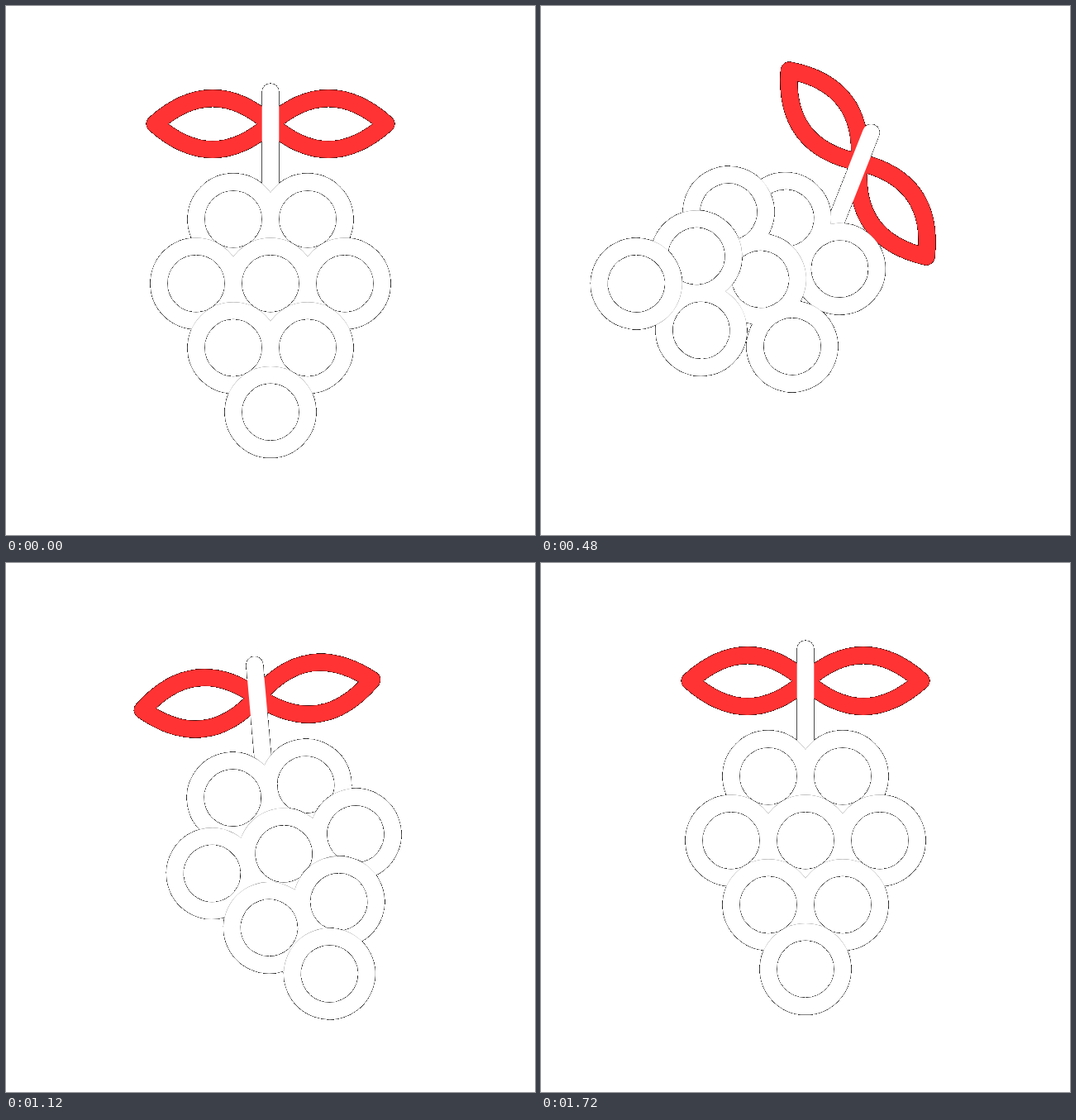
An HTML page with a canvas that plays this animation: 640 px wide and 640 px high, repeating every 2000 ms.

```html
<!DOCTYPE html>
<html lang="en">
<head>
<meta charset="utf-8">
<title>Swinging grapes</title>
<style>
  html, body { margin: 0; width: 100%; height: 100%; overflow: hidden; background: #fff; }
  canvas { display: block; filter: url(#edge); }
  svg { position: absolute; width: 0; height: 0; }
</style>
</head>
<body>
<canvas id="stage" width="640" height="640"></canvas>
<svg aria-hidden="true">
  <!-- Puts black under every half-covered pixel, which gives the hairline edges -->
  <filter id="edge" x="0" y="0" width="1" height="1" color-interpolation-filters="sRGB">
    <feColorMatrix values="0 0 0 0 0  0 0 0 0 0  0 0 0 0 0  0 0 0 14 -0.3" result="matte"/>
    <feMerge><feMergeNode in="matte"/><feMergeNode in="SourceGraphic"/></feMerge>
  </filter>
</svg>
<script>
const ctx = document.getElementById('stage').getContext('2d');
const LOOP = 2000, STEP = 40;
const MID = 320, RADIUS = 45, LINE = 20.6;
const FIRST_ROW = 257.9, ROW_GAP = 77.8, COL_GAP = 90;
const ROWS = [2, 3, 2, 1];
const STEM_TOP = 104, STEM_END = 224;
const LEAF_Y = 142.6, LEAF_LENGTH = 140, LEAF_BEND = 62;

// Keys are [time in ms, value], eased in and out between neighbours
const swing = [[0, 0], [433, 22.3], [980, -13], [1300, 6.4], [1700, 0]];
const drop = [[0, 0], [320, 50], [910, -38], [1206, 33], [1580, 0]];
const leftLeaf = [[0, 0], [390, 37], [850, -22], [1380, 18], [1690, 0]];
const rightLeaf = [[67, 0], [446, 33.6], [1012, -13], [1340, 25.3], [1690, 0]];

function at(keys, t) {
  if (t <= keys[0][0]) return keys[0][1];
  for (let i = 1; i < keys.length; i++) {
    const [t0, a] = keys[i - 1], [t1, b] = keys[i];
    if (t < t1) {
      const p = (t - t0) / (t1 - t0);
      return a + (b - a) * p * p * (3 - 2 * p);
    }
  }
  return keys[keys.length - 1][1];
}

function turn(y, degrees) {
  ctx.translate(MID, y);
  ctx.rotate(degrees * Math.PI / 180);
  ctx.translate(-MID, -y);
}

function leaf(side, angle) {
  const tip = MID + side * LEAF_LENGTH, mid = MID + side * LEAF_LENGTH / 2;
  ctx.save();
  turn(LEAF_Y, angle);
  ctx.beginPath();
  ctx.moveTo(MID, LEAF_Y);
  ctx.quadraticCurveTo(mid, LEAF_Y - LEAF_BEND, tip, LEAF_Y);
  ctx.quadraticCurveTo(mid, LEAF_Y + LEAF_BEND, MID, LEAF_Y);
  ctx.closePath();
  ctx.strokeStyle = '#ff3333';
  ctx.stroke();
  ctx.restore();
}

function circles(count, y, r) {
  ctx.beginPath();
  for (let i = 0; i < count; i++) {
    const x = MID + (i - (count - 1) / 2) * COL_GAP;
    ctx.moveTo(x + r, y);
    ctx.arc(x, y, r, 0, Math.PI * 2);
  }
}

function grapes(count, y) {
  // Clear what lies behind the row, then draw its rings
  ctx.globalCompositeOperation = 'destination-out';
  circles(count, y, RADIUS + LINE / 2);
  ctx.fill();
  ctx.globalCompositeOperation = 'source-over';
  circles(count, y, RADIUS);
  ctx.stroke();
}

function draw(t) {
  const angle = at(swing, t);
  ctx.setTransform(1, 0, 0, 1, 0, 0);
  ctx.clearRect(0, 0, 640, 640);
  ctx.lineWidth = LINE;
  ctx.lineCap = ctx.lineJoin = 'round';

  ctx.translate(0, at(drop, t));
  turn(MID, angle);
  leaf(-1, at(leftLeaf, t));
  leaf(1, at(rightLeaf, t));

  ctx.strokeStyle = '#fff';
  ctx.beginPath();
  ctx.moveTo(MID, STEM_TOP);
  ctx.lineTo(MID, STEM_END);
  ctx.stroke();

  // Each row hangs from the one above and adds the same turn again
  ROWS.forEach((count, i) => {
    const y = FIRST_ROW + i * ROW_GAP;
    turn(y - RADIUS, angle);
    grapes(count, y);
  });
}

const start = performance.now();
function frame() {
  const t = (performance.now() - start) % LOOP;
  draw(Math.floor(t / STEP) * STEP);
  requestAnimationFrame(frame);
}
frame();
</script>
</body>
</html>
```
